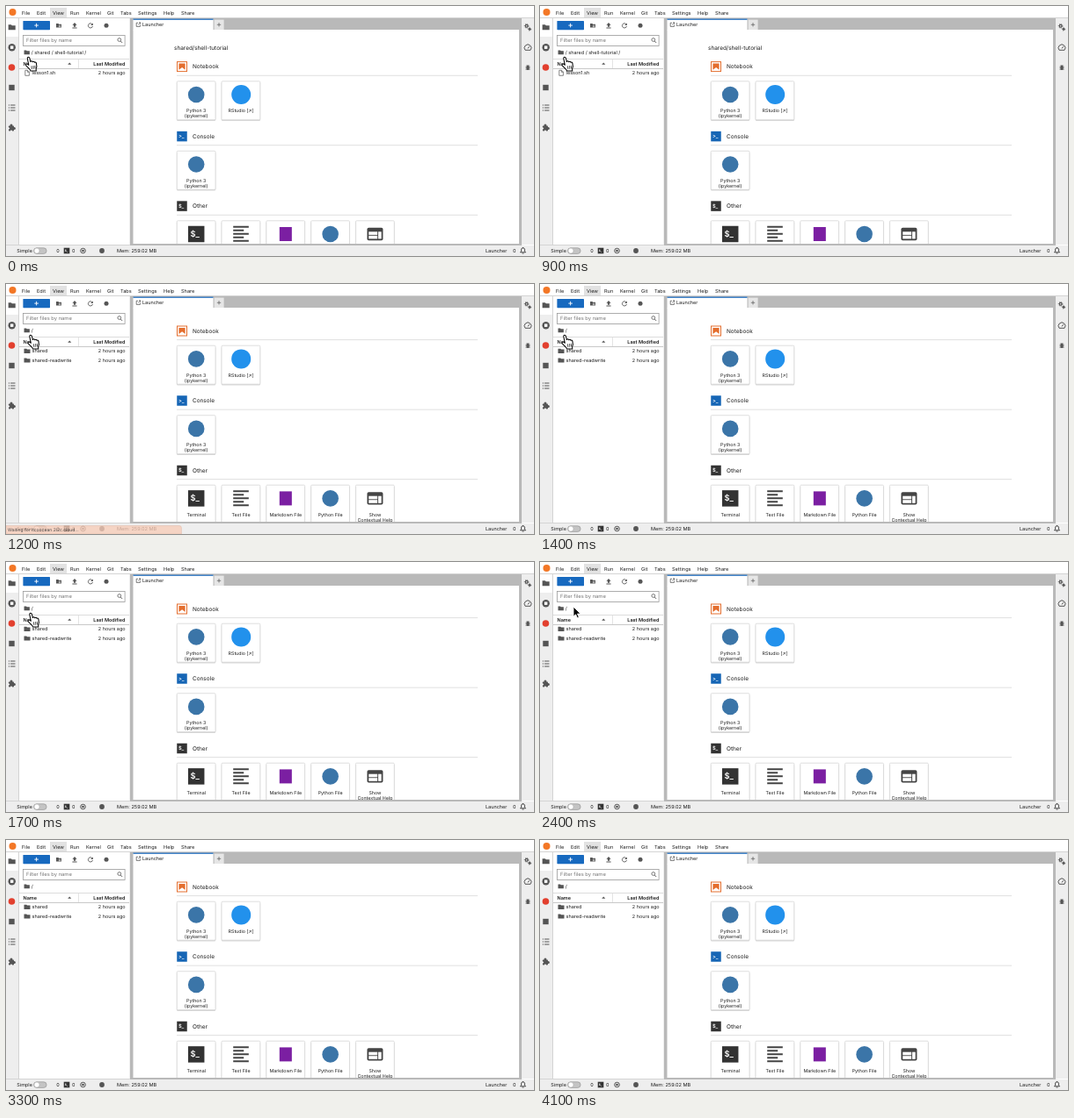
These frames come from a looping animation (600x285 px, 4.2 s). An HTML page:

```html
<!DOCTYPE html>
<html lang="en">
<head>
<meta charset="utf-8">
<title>Launcher</title>
<style>
html, body { margin: 0; width: 100%; height: 100%; overflow: hidden; background: #fff; }
svg { display: block; width: 100vw; height: 100vh; }
text { font-family: Inter, "Open Sans", sans-serif; text-rendering: geometricPrecision; white-space: pre; }
</style>
</head>
<body>
<svg id="stage" viewBox="0 0 600 285"></svg>
<script>
const LOOP = 4200, STEP = 100;
const INK = '#1c1c1c', ICON = '#555', GREY = '#b9b9b9', BAR = '#eeeeee', BLUE = '#1769bf';
const PYTHON = '#3b75a8', ORANGE = '#e46e2e';

const rect = (x, y, w, h, fill, more = '') =>
  `<rect x="${x}" y="${y}" width="${w}" height="${h}" fill="${fill}" ${more}/>`;
const circle = (x, y, r, fill, more = '') =>
  `<circle cx="${x}" cy="${y}" r="${r}" fill="${fill}" ${more}/>`;
const shape = (d, fill, more = '') => `<path d="${d}" fill="${fill}" ${more}/>`;
const line = (d, color = ICON, width = 1) =>
  `<path d="${d}" fill="none" stroke="${color}" stroke-width="${width}"/>`;
const text = (x, y, s, size = 5.6, more = '') =>
  `<text x="${x}" y="${y}" font-size="${size}" fill="${INK}" ${more}>${s}</text>`;
const centered = (x, y, s, size = 5.3) => text(x, y, s, size, 'text-anchor="middle"');
const at = (x, y, body, scale = 1) => `<g transform="translate(${x} ${y}) scale(${scale})">${body}</g>`;
const group = (id, body, more = '') => `<g id="${id}" ${more}>${body}</g>`;

// Icons are centred on the origin.
const folder = shape('M-3.5-2.6h2.8l.8.8h3.4v4.4h-7z', ICON);
const file = line('M-2.2-3h2.8l1.8 1.8v4.2h-4.6zM.4-3v2h2', ICON, .7);
const prompt = (size, fill, mark) =>
  rect(-size / 2, -size / 2, size, size, fill) +
  `<text x="${-size * .36}" y="${size * .16}" font-size="${size * .5}" font-weight="600" fill="#fff">${mark}</text>`;
const notebook = rect(-5.5, -5.5, 11, 11, '#fff', `stroke="${ORANGE}"`) +
  shape('M-3.6-3.6h7.2v7.2l-3.5-2.8-3.7 2.8z', ORANGE);
const python = circle(0, 0, 9.3, PYTHON);
const textLines = line('M-8.8-8.2h17.6M-8.8-4.2h12M-8.8-.2h17.6M-8.8 3.8h12M-8.8 7.8h17.6', '#444', 1.9);
const help = at(0, 0, rect(-10, -8, 20, 16, '#444', 'rx="2"') +
  rect(-8, -3, 11, 4, '#fff') + rect(-8, 2, 11, 4, '#fff') + rect(4, -3, 4, 9, '#fff'), .9);
const gear = r => circle(0, 0, r, 'none', `stroke="${ICON}" stroke-width="1.3"`) +
  circle(0, 0, r + .9, 'none', `stroke="${ICON}" stroke-width="1" stroke-dasharray="1 1.1"`);
const stop = circle(0, 0, 4.2, ICON) + rect(-1.7, -1.7, 3.4, 3.4, '#fff');
const list = line('M-1.6-3h5.4M-1.6 0h5.4M-1.6 3h5.4M-3.8-3h1.2M-3.8 0h1.2M-3.8 3h1.2', ICON, 1.1);
const puzzle = rect(-3.7, -2, 6, 6, ICON, 'rx=".7"') + circle(-.7, -2.5, 1.5, ICON) +
  circle(2.7, 1, 1.5, ICON) + circle(-3.6, 1, 1.1, BAR) + circle(-.7, 4, 1.1, BAR);
const gauge = line('M-3 2.8A3.9 3.9 0 1 1 3 2.8zM-.2.8L2-1.3', ICON, 1);
const bug = shape('M-1.8-1.5a1.8 1.8 0 0 1 3.6 0v3a1.8 1.8 0 0 1-3.6 0z', ICON) +
  line('M-3-1.3h6M-3 .5h6M-3 2.3h6M-1.5-3.6l1 1M1.5-3.6l-1 1', ICON, .8);
const bell = line('M-3 1.8h6l-1-1.2v-1.8a2 2 0 0 0-4 0v1.8zM-.8 3h1.6M0-3.9v.8', '#333', .9);

function menuBar() {
  const items = { File: 18, Edit: 35, View: 53, Run: 73, Kernel: 91, Git: 115, Tabs: 130, Settings: 150, Help: 179, Share: 199 };
  return rect(0, 0, 600, 14, '#fff') + rect(50, 2, 19, 11, '#e2e2e2') + circle(7.5, 7, 4, '#f37726') +
    Object.entries(items).map(([name, x]) => text(x, 9.7, name)).join('') +
    rect(0, 13, 600, 1, '#d4d4d4');
}

function sideBars() {
  return rect(0, 14, 14, 258, BAR) + rect(0, 14, 14, 21, '#fff') + rect(14, 14, 1, 258, '#d4d4d4') +
    at(6.7, 24.2, folder, 1.15) + at(6.7, 47.2, stop) + circle(6.5, 70, 3.8, '#e2402f') +
    rect(3.3, 89.8, 6.4, 6.4, ICON) + at(6.7, 116, list) + at(6.7, 138.5, puzzle) +
    rect(586, 14, 14, 258, BAR) +
    at(591.6, 22.8, gear(1.4)) + at(595, 26.4, gear(.7)) + at(593, 47.5, gauge) + at(593, 70.3, bug, .85);
}

function filePanel() {
  return rect(15, 14, 125.5, 258, '#fff') +
    rect(19.4, 17, 30.6, 10.2, BLUE, 'rx=".6"') + line('M34.6 19.8v4.6M32.3 22.1h4.6', '#fff', .9) +
    at(60, 22.3, at(0, 0, folder, .85) + line('M1-.6v2.6M-.3.7h2.6', '#fff', .6)) +
    shape('M78 19l2.6 2.8h-1.5v2h-2.2v-2h-1.5zM75.4 24.6h5.2v1h-5.2z', ICON) +
    line('M98.2 21a2.6 2.6 0 1 0 .3 2', ICON, .9) + shape('M98.8 19.4v2.6h-2.6z', ICON) +
    circle(114, 22.3, 2.5, ICON) +
    rect(19.5, 33.4, 115.6, 12, '#fff', 'stroke="#999" stroke-width=".8"') +
    `<text x="23" y="41.2" font-size="5.8" fill="#757575">Filter files by name</text>` +
    circle(128.8, 38.5, 1.9, 'none', `stroke="${ICON}" stroke-width=".8"`) + line('M130.2 40l2 2', ICON, .9) +
    at(23.7, 52.8, folder, .9) +
    rect(15, 60, 125, 1, '#dcdcdc') + rect(15, 71, 125, 1, '#c8c8c8') + rect(82, 61, .8, 10, '#dcdcdc') +
    text(19.5, 67.9, 'Name', 5.5, 'font-weight="600"') + shape('M70.2 66.8h4l-2-2.2z', ICON) +
    text(135.5, 67.9, 'Last Modified', 5.5, 'font-weight="600" text-anchor="end"');
}

function fileRow(y, icon, name) {
  return at(24, y, icon) + text(29.6, y + 2, name, 5.5) +
    text(135.5, y + 2, '2 hours ago', 5.45, 'text-anchor="end"');
}

function card(column, y, icon, ...label) {
  const x = 194.2 + column * 50.8;
  return rect(x - .3, y + 1, 44.4, 44.2, '#000', 'rx="1.5" opacity=".16"') +
    rect(x, y, 43.8, 44, '#fff', 'rx="1" stroke="#d2d2d2" stroke-width=".7"') +
    at(x + 22, y + 15.2, icon) +
    label.map((s, i) => centered(x + 22, y + 35.4 + i * 6, s)).join('');
}

function section(y, icon, name, ...cards) {
  return at(200, y, icon) + text(212, y + 2.4, name, 6.45) + rect(194, y + 9.7, 342, .9, '#dcdcdc') +
    cards.map((c, i) => card(i, y + 16.7, ...c)).join('');
}

function launcher() {
  const kernel = [python, 'Python 3', '(ipykernel)'];
  return rect(140.5, 14, 445.5, 259, GREY) +
    rect(144.5, 15, 91, 12.5, '#fff') + rect(144.5, 14.6, 91, 1.2, BLUE) +
    line('M150 19.2h-1.8v4.2h4.2v-1.8M151 18.9h1.8v1.8M152.6 19l-2.4 2.4', '#444', .7) +
    text(155, 23.3, 'Launcher', 5.5) +
    rect(236.6, 15.6, 11, 11.6, '#e6e6e6') + line('M239.8 21.3h4.4M242 19.1v4.4', '#555', .7) +
    rect(144.5, 27, 438.5, 244, '#fff') +
    `<clipPath id="view"><rect x="144.5" y="27" width="438.5" height="244"/></clipPath>` +
    `<g clip-path="url(#view)">` + group('sections',
      group('cwd', text(191, 34.5, 'shared/shell-tutorial', 6.45)) +
      section(53.5, notebook, 'Notebook', kernel, [circle(.2, 0, 11, '#2291ec'), 'RStudio [↗]']) +
      section(133, prompt(11.5, '#1565b5', '&gt;_'), 'Console', kernel) +
      section(212.5, prompt(11.5, '#333', '$_'), 'Other',
        [prompt(18.5, '#333', '$_'), 'Terminal'],
        [textLines, 'Text File'],
        [rect(-7, -8, 14, 16, '#7b1fa2'), 'Markdown File'],
        [python, 'Python File'],
        [help, 'Show', 'Contextual Help'])) + '</g>';
}

function statusBar() {
  return rect(0, 273, 600, 12, BAR) + rect(0, 272, 140.5, 1, '#d4d4d4') +
    text(12.3, 281, 'Simple', 5.5) +
    rect(31.5, 275.8, 14.6, 6.6, '#c4c4c4', 'rx="3.3" stroke="#8c8c8c" stroke-width=".6"') +
    circle(35, 279.1, 3, '#fff', 'stroke="#999" stroke-width=".4"') +
    text(57.3, 281, '0', 5.5) + at(69, 279, prompt(6.6, '#333', '$_')) + text(75, 281, '0', 5.5) +
    circle(87.5, 279, 2.8, 'none', `stroke="${ICON}" stroke-width="1"`) + rect(86.3, 277.8, 2.4, 2.4, ICON) +
    circle(109, 279, 2.9, ICON) +
    text(126, 281, 'Mem: 259.02 MB', 5.6) +
    text(545, 281, 'Launcher', 5.5) + text(576, 281, '0', 5.5) + at(587.5, 279, bell);
}

function overlays() {
  const outline = 'stroke-width=".9" stroke-linejoin="round"';
  const hand = shape('M2.2 1.6C1.9-.1 4-.4 4.4 1.2l.9 3.6c.5-.9 1.8-.8 2.1.2.6-.7 1.7-.4 1.9.5.8-.5 1.6 0 1.7.9l.4 3.2-.7 2.2.2 2.2H5.4l-.5-1.3L1 8.9C-.2 7.6 1.3 6.3 2.5 7.3l1 .8z',
      '#fff', `stroke="#000" ${outline}`) +
    line('M6.2 9l.4 3.2M8 8.8l.3 3.2M9.6 8.6l.2 3', '#000', .6);
  return group('popup',
      shape('M0 275.6h197q2.4 0 2.4 2.4v7H0z', '#f8cdb9', 'stroke="#d8a48e" stroke-width=".5"') +
      text(2, 282, 'Waiting for itcoocean.2i2c.cloud...', 5)) +
    group('hand', at(0, 0, hand, 1.15)) +
    group('arrow', shape('M0 0v11.2l2.6-2.4 1.8 4 1.9-.9-1.8-3.8h3.6z', '#000', `stroke="#fff" ${outline}`));
}

document.getElementById('stage').innerHTML =
  rect(0, 0, 600, 285, '#fff') + menuBar() + launcher() + filePanel() + sideBars() +
  group('nested', text(28.8, 54.8, '/ shared / shell-tutorial /', 5.5) + fileRow(76.3, file, 'lesson1.sh')) +
  group('root', text(28.8, 54.8, '/', 5.5) + fileRow(76.3, folder, 'shared') + fileRow(87, folder, 'shared-readwrite')) +
  statusBar() + overlays();

const part = Object.fromEntries([...document.querySelectorAll('g[id]')].map(g => [g.id, g]));
const show = (el, on) => el.setAttribute('visibility', on ? 'visible' : 'hidden');
const move = (el, x, y) => el.setAttribute('transform', `translate(${x} ${y})`);

const OPENED = 1000, ARROW_FROM = 2200, CURSOR_GONE = 2700;
const popupFade = { 1000: .5, 1100: 1, 1200: .78, 1300: .4 };
const arrowPath = { 2200: [32, 56], 2300: [36, 53], 2400: [38, 51], 2500: [50, 32], 2600: [76, 2] };

function draw(time) {
  const t = Math.floor((time % LOOP) / STEP) * STEP;
  const opened = t >= OPENED;
  show(part.nested, !opened);
  show(part.root, opened);
  show(part.cwd, !opened);
  move(part.sections, 0, opened ? 0 : 15.6);
  part.popup.setAttribute('opacity', popupFade[t] || 0);
  show(part.hand, t < ARROW_FROM);
  move(part.hand, t < STEP ? 21.8 : 24.3, 58);
  show(part.arrow, t >= ARROW_FROM && t < CURSOR_GONE);
  if (arrowPath[t]) move(part.arrow, ...arrowPath[t]);
}

const start = performance.now();
function tick() {
  draw(performance.now() - start);
  requestAnimationFrame(tick);
}
tick();
</script>
</body>
</html>
```
